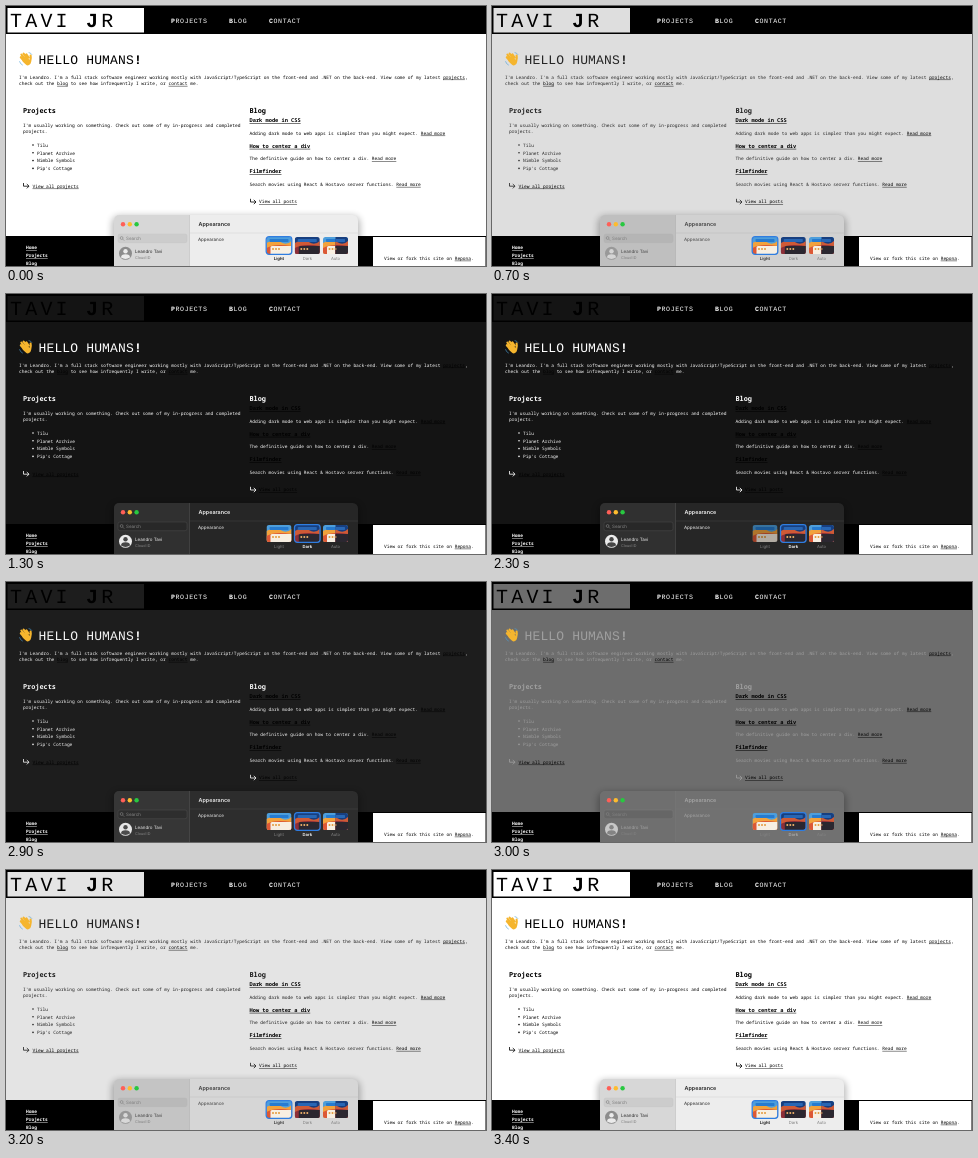
These frames come from a looping animation (480x260 px, 3.7 s). An HTML page:

```html
<!DOCTYPE html>
<html lang="en">
<head>
<meta charset="utf-8">
<title>Theme switch</title>
<style>
  html, body { margin: 0; width: 100%; height: 100%; overflow: hidden; background: #000; }
  svg { display: block; width: 480px; height: 260px; }
  text {
    font: 4.545px "Noto Sans Mono", "DejaVu Sans Mono", monospace;
    fill: var(--text);
    text-rendering: geometricPrecision;
    white-space: pre;
  }
  .page { fill: var(--page); }
  .link { fill: #000; text-decoration: underline; text-decoration-thickness: .5px; }
  .bold { font-weight: 700; }
  .white { fill: #fff; }
  .head { font-size: 6.85px; font-weight: 700; }
  .post { font-size: 5.33px; font-weight: 700; }
  .display { font-family: "Liberation Mono", monospace; }
  .logo { font-size: 20px; letter-spacing: 3.2px; fill: #000; }
  .nav { font-size: 6.6px; letter-spacing: .6px; fill: #fff; }
  .hello { font-size: 13px; letter-spacing: .15px; }
  .arrow { fill: none; stroke: var(--text); stroke-width: .8; }
  #window text { font-family: Inter, sans-serif; font-size: 4.5px; fill: var(--label); }
  #window .muted { fill: var(--muted); }
  #window .choice { font-size: 4.2px; text-anchor: middle; fill: var(--muted); }
  #window .on .choice { font-weight: 700; fill: var(--label); }
  .ring { fill: none; stroke: none; stroke-width: 1.3; }
  .on .ring { stroke: #2f7de0; }
  .pressed .thumb { filter: brightness(.72); }
</style>
</head>
<body>
<svg viewBox="0 0 480 260">
  <defs>
    <filter id="blur" x="-20%" y="-40%" width="140%" height="180%"><feGaussianBlur stdDeviation="3.5"/></filter>
    <clipPath id="card"><rect width="25" height="17" rx="2.5"/></clipPath>
    <clipPath id="half"><rect x="12.5" width="12.5" height="17"/></clipPath>
    <path id="arrow" d="M.5 0V3.2H6M3.8 1L6 3.2L3.8 5.4"/>
    <g id="day">
      <rect width="25" height="17" fill="#4d9edb"/>
      <path d="M0 6Q8 1 14 5T25 4V17H0Z" fill="#f2a23c"/>
      <path d="M0 11Q8 6 25 9V17H0Z" fill="#dc5836"/>
      <rect x="3" y="2" width="19" height="3" rx=".7" fill="#267bd0"/>
      <path d="M4 17V10.5Q4 9 5.5 9H25V17Z" fill="#f7efe2"/>
      <path d="M6.5 12h.01M9.5 12h.01M12.5 12h.01" stroke="#e49a3c" stroke-width="2" stroke-linecap="round"/>
    </g>
    <g id="night">
      <rect width="25" height="17" fill="#173f80"/>
      <path d="M0 6Q8 1 14 5T25 4V17H0Z" fill="#cf5a36"/>
      <path d="M0 11Q8 6 25 9V17H0Z" fill="#8c2e38"/>
      <rect x="3" y="2" width="19" height="3" rx=".7" fill="#2866b4"/>
      <path d="M4 17V10.5Q4 9 5.5 9H25V17Z" fill="#2b2730"/>
      <path d="M6.5 12h.01M9.5 12h.01M12.5 12h.01" stroke="#efb06a" stroke-width="2" stroke-linecap="round"/>
    </g>
  </defs>

  <rect width="480" height="260"/>
  <rect class="page" y="28" width="480" height="202"/>
  <rect class="page" x="1.5" y="2" width="136.5" height="24.5"/>
  <text class="display logo" x="4" y="21">TAVI <tspan class="bold">J</tspan>R</text>
  <text class="display nav" x="165" y="16.7"><tspan class="bold">P</tspan>ROJECTS</text>
  <text class="display nav" x="223" y="16.7"><tspan class="bold">B</tspan>LOG</text>
  <text class="display nav" x="263" y="16.7"><tspan class="bold">C</tspan>ONTACT</text>

  <!-- waving hand -->
  <g fill="none" stroke="#f5b52e" stroke-linecap="round" stroke-width="2.1">
    <path d="M18 55L14.8 51.2M19 53L15.4 48.6M21 52L17.6 47.6M22.6 51.6L20.4 48.4M24.2 55.5Q25.2 52 24.6 49.6"/>
    <path d="M19.6 54.2L21.8 56.2" stroke-width="6"/>
    <path d="M13.6 55.6Q14.2 58 16.4 59M23 46.6Q25 47 25.8 48.4" stroke="#4aa0d8" stroke-width=".6"/>
  </g>
  <text class="display hello" x="32.5" y="58">HELLO HUMANS<tspan class="bold">!</tspan></text>

  <text x="13" y="72.6">I'm Leandro. I'm a full stack software engineer working mostly with JavaScript/TypeScript on the front-end and .NET on the back-end. View some of my latest <tspan class="link">projects</tspan>,</text>
  <text x="13" y="78.9">check out the <tspan class="link">blog</tspan> to see how infrequently I write, or <tspan class="link">contact</tspan> me.</text>

  <text class="head" x="17" y="106.6">Projects</text>
  <text x="17" y="120.6">I'm usually working on something. Check out some of my in-progress and completed</text>
  <text x="17" y="127">projects.</text>
  <path d="M27 139h.01M27 146.8h.01M27 154.6h.01M27 162.4h.01" stroke="var(--text)" stroke-width="1.6" stroke-linecap="round"/>
  <text x="31" y="140.7">Tilu</text>
  <text x="31" y="148.5">Planet Archive</text>
  <text x="31" y="156.3">Nimble Symbols</text>
  <text x="31" y="164.1">Pip's Cottage</text>
  <use href="#arrow" class="arrow" x="17" y="177"/>
  <text class="link" x="26.5" y="181.6">View all projects</text>

  <text class="head" x="243.5" y="106.6">Blog</text>
  <text class="post link" x="243.5" y="116">Dark mode in CSS</text>
  <text x="243.5" y="128.6">Adding dark mode to web apps is simpler than you might expect. <tspan class="link">Read more</tspan></text>
  <text class="post link" x="243.5" y="141.8">How to center a div</text>
  <text x="243.5" y="154.3">The definitive guide on how to center a div. <tspan class="link">Read more</tspan></text>
  <text class="post link" x="243.5" y="167.4">Filmfinder</text>
  <text x="243.5" y="179.9">Search movies using React &amp; Hostavo server functions. <tspan class="link">Read more</tspan></text>
  <use href="#arrow" class="arrow" x="244" y="192.8"/>
  <text class="link" x="253" y="197.4">View all posts</text>

  <text class="link white bold" x="20" y="243">Home</text>
  <text class="link white bold" x="20" y="251">Projects</text>
  <text class="link white bold" x="20" y="259">Blog</text>
  <rect x="367" y="231" width="112.5" height="29" fill="#fff"/>
  <text x="378" y="253.7" style="fill:#000">View or fork this site on <tspan class="link">Repona</tspan>.</text>

  <g id="window">
    <rect x="106" y="210" width="248" height="60" rx="7" opacity=".28" filter="url(#blur)"/>
    <rect x="108" y="209" width="244" height="60" rx="5.5" fill="var(--main)"/>
    <path d="M183.5 209V260H108V214.5Q108 209 113.500 209Z" fill="var(--side)"/>
    <path d="M183.5 209V260" stroke="var(--line)" stroke-width=".7"/>
    <path d="M184 227H352" stroke="var(--line)" stroke-width=".4"/>
    <circle cx="117" cy="218.2" r="2.2" fill="#ff5f57"/>
    <circle cx="123.800" cy="218.2" r="2.2" fill="#febc2e"/>
    <circle cx="130.600" cy="218.2" r="2.2" fill="#28c840"/>
    <rect x="112" y="228" width="69" height="8.700" rx="2" fill="var(--field)" stroke="var(--line)" stroke-width=".5"/>
    <path d="M116.800 233.200l1.400 1.400M117 232a1.400 1.400 0 1 0-2.800 0a1.400 1.400 0 1 0 2.800 0" fill="none" stroke="var(--muted)" stroke-width=".6"/>
    <text class="muted" x="120" y="234">Search</text>
    <circle cx="119.500" cy="247.300" r="6.500" fill="var(--avatar)"/>
    <circle cx="119.500" cy="245.300" r="2.200" fill="var(--figure)"/>
    <path d="M115 251.600Q115 248.300 119.500 248.300T124 251.600Q119.500 254.500 115 251.600" fill="var(--figure)"/>
    <text x="129" y="247.400">Leandro Tavi</text>
    <text class="muted" x="129" y="252.500" style="font-size:3.8px">Cloud ID</text>
    <text x="192.500" y="220" style="font-size:5.4px;font-weight:600">Appearance</text>
    <text x="192" y="234.800">Appearance</text>

    <g id="light" transform="translate(260.500 231)">
      <g class="thumb" clip-path="url(#card)"><use href="#day"/></g>
      <rect class="ring" x="-.3" y="-.3" width="25.600" height="17.600" rx="2.800"/>
      <text class="choice" x="12.500" y="22.600">Light</text>
    </g>
    <g id="dark" transform="translate(288.800 231)">
      <g class="thumb" clip-path="url(#card)"><use href="#night"/></g>
      <rect class="ring" x="-.3" y="-.3" width="25.600" height="17.600" rx="2.800"/>
      <text class="choice" x="12.500" y="22.600">Dark</text>
    </g>
    <g transform="translate(317 231)">
      <g class="thumb" clip-path="url(#card)"><use href="#day"/><use href="#night" clip-path="url(#half)"/></g>
      <text class="choice" x="12.500" y="22.600">Auto</text>
    </g>
  </g>
</svg>
<script>
const LOOP = 3700, STEP = 100, FADE = 550;
const root = document.documentElement;
const light = document.getElementById('light');
const dark = document.getElementById('dark');

// [light grey, dark grey]
const shades = {
  page: [255, 20], text: [0, 255], main: [237, 38], side: [215, 48],
  line: [196, 74], field: [204, 40], label: [40, 240], muted: [125, 135],
  avatar: [140, 235], figure: [235, 70]
};

const bezier = (a, b, s) => 3 * a * s * (1 - s) ** 2 + 3 * b * s * s * (1 - s) + s ** 3;

// CSS "ease" timing
function ease(x) {
  if (x <= 0) return 0;
  if (x >= 1) return 1;
  let lo = 0, hi = 1;
  for (let i = 0; i < 20; i++) {
    const mid = (lo + hi) / 2;
    if (bezier(.25, .25, mid) < x) lo = mid; else hi = mid;
  }
  return bezier(.1, 1, lo);
}

function draw() {
  const t = Math.floor(performance.now() % LOOP / STEP) * STEP;
  const amount = ease((t - 630) / FADE) - ease((t - 2870) / FADE);
  for (const [name, [day, night]] of Object.entries(shades)) {
    const v = Math.round(day + (night - day) * amount);
    root.style.setProperty('--' + name, `rgb(${v},${v},${v})`);
  }
  const isDark = amount > .5;
  light.classList.toggle('on', !isDark);
  dark.classList.toggle('on', isDark);
  dark.classList.toggle('pressed', t >= 100 && t < 200);
  light.classList.toggle('pressed', t >= 2300 && t < 2600);
  requestAnimationFrame(draw);
}
draw();
</script>
</body>
</html>
```
